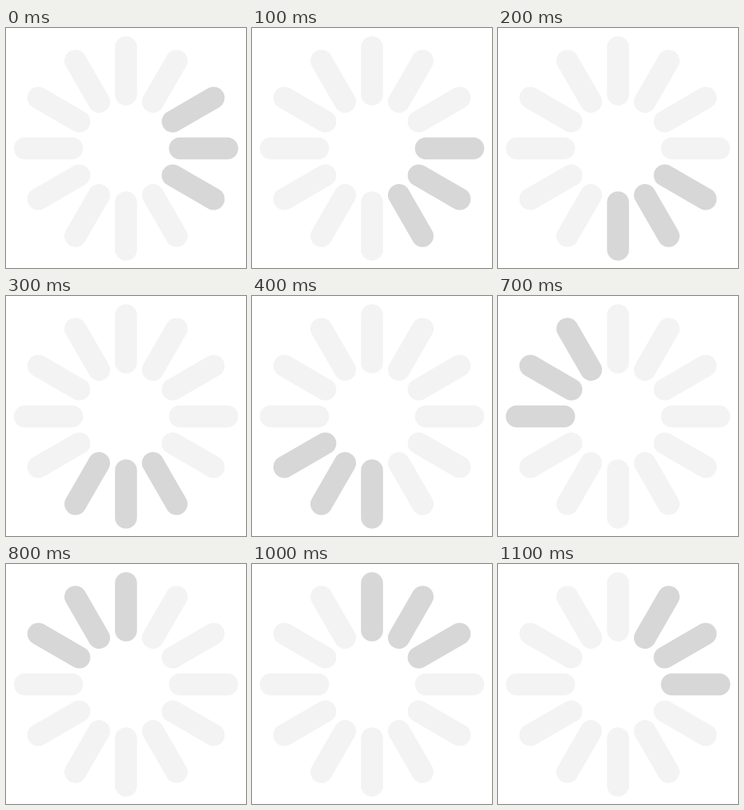
Animation of 300 by 300 pixels, one loop 1.2 s. Source, as an HTML page:

```html
<!DOCTYPE html>
<html lang="en">
<head>
<meta charset="utf-8">
<title>Spinner</title>
<style>
  html, body { margin: 0; width: 100%; height: 100%; overflow: hidden; background: #fff; }
  svg { display: block; width: 100%; height: 100%; }
  line { stroke-width: 27.5; stroke-linecap: round; }
</style>
</head>
<body>
<svg viewBox="0 0 300 300"><g id="spokes" transform="translate(150 150.5)"></g></svg>
<script>
  const COUNT = 12, STEP = 100, LIT = 3, FIRST = 2;
  const INNER = 67.4, OUTER = 126.5;
  const group = document.getElementById('spokes');

  const spokes = Array.from({ length: COUNT }, (_, i) => {
    const line = document.createElementNS('http://www.w3.org/2000/svg', 'line');
    line.setAttribute('y1', -INNER);
    line.setAttribute('y2', -OUTER);
    line.setAttribute('transform', `rotate(${i * 360 / COUNT})`);
    return group.appendChild(line);
  });

  function render(time) {
    const tail = FIRST + Math.floor(time / STEP) % COUNT;
    spokes.forEach((spoke, i) => {
      const lit = (i - tail + 2 * COUNT) % COUNT < LIT;
      spoke.setAttribute('stroke', lit ? '#d7d7d7' : '#f3f3f3');
    });
  }

  const start = performance.now();
  function tick() {
    render(performance.now() - start);
    requestAnimationFrame(tick);
  }
  tick();
</script>
</body>
</html>
```
